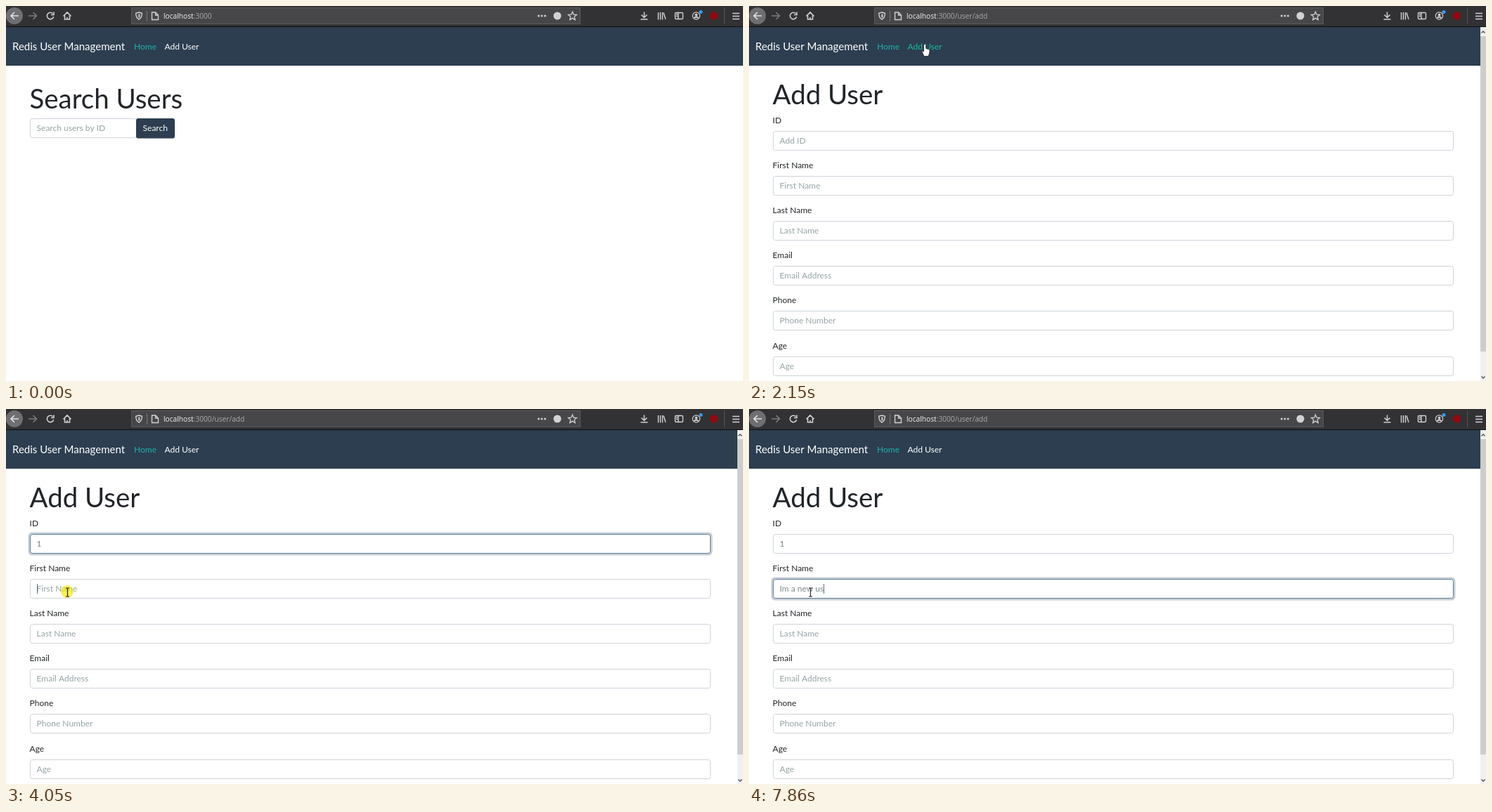
Recreate the animation shown at these times as an HTML page with a canvas. Size 1048x534 px, loop 8 s.

```html
<!DOCTYPE html>
<html lang="en">
<head>
<meta charset="utf-8">
<title>Redis User Management</title>
<style>
  html, body { margin: 0; width: 100%; height: 100%; overflow: hidden; background: #fff; }
  canvas { display: block; width: 1048px; height: 534px; }
</style>
</head>
<body>
<canvas id="stage" width="1048" height="534"></canvas>
<script>
const ctx = document.getElementById('stage').getContext('2d');
const LOOP = 8000, W = 1048, H = 534;
const LATO = 'Lato, sans-serif', UI = '"Open Sans", "Noto Sans", sans-serif';
const NAVY = '#2c3e50', INK = '#212529', HINT = '#95a5a6', TYPED = '#7b8a8b', ICON = '#d2d2d4';

// ---- timeline ----
const NAVIGATE = 2050, ID_TYPED = 3500, FIRST_FOCUS = 4050;
// start, end, number of steps, destination
const moves = [
  [130, 130, 1, 984, 522], [205, 205, 1, 725, 497], [280, 280, 1, 752, 459],
  [430, 1200, 11, 280, 109], [1280, 1660, 6, 250, 54], [2230, 2730, 7, 105, 178],
  [2810, 2970, 3, 127, 191], [3580, 3800, 4, 87, 255], [3980, 4050, 2, 88, 261]
];
const clicks = [[1890, 2050], [2970, 3140], [3980, 4210]];
const statusShown = [[1580, NAVIGATE], [2230, 2810]];
const phrase = 'Im a new us';
const keyTimes = [5660, 5910, 6120, 6350, 6430, 6660, 6810, 6990, 7140, 7720, 7860];
const fields = [
  ['ID', 'Add ID'], ['First Name', 'First Name'], ['Last Name', 'Last Name'],
  ['Email', 'Email Address'], ['Phone', 'Phone Number'], ['Age', 'Age']
];

const during = (t, spans) => spans.some(([a, b]) => t >= a && t < b);
const smooth = p => p * p * (3 - 2 * p);
const fade = (t, a, b) => t < a ? 0 : t < b ? 0.6 : 1;

function pointer(t) {
  let x = 1080, y = 540;
  for (const [a, b, n, tx, ty] of moves) {
    if (t < a) break;
    const k = b > a ? Math.floor((t - a) / (b - a) * (n - 1) + 1e-6) + 1 : 1;
    const p = smooth(Math.min(1, k / n));
    x = Math.round(x + (tx - x) * p);
    y = Math.round(y + (ty - y) * p);
  }
  return { x, y };
}

// ---- drawing helpers ----
function rect(x, y, w, h, color) {
  ctx.fillStyle = color;
  ctx.fillRect(x, y, w, h);
}
function text(str, x, y, size, color, family = LATO) {
  ctx.font = size + 'px ' + family;
  ctx.fillStyle = color;
  ctx.fillText(str, x, y);
  return ctx.measureText(str).width;
}
function disc(x, y, r, color) {
  ctx.fillStyle = color;
  ctx.beginPath();
  ctx.arc(x, y, r, 0, 7);
  ctx.fill();
}
function line(d, color = ICON, width = 1.4) {
  ctx.strokeStyle = color;
  ctx.lineWidth = width;
  ctx.stroke(new Path2D(d));
}
function frame(x, y, w, h, r, color, width = 1) {
  ctx.strokeStyle = color;
  ctx.lineWidth = width;
  ctx.beginPath();
  ctx.roundRect(x, y, w, h, r);
  ctx.stroke();
}

// ---- browser toolbar ----
function star(cx, cy, r) {
  let d = '';
  for (let i = 0; i < 10; i++) {
    const a = -Math.PI / 2 + i * Math.PI / 5, q = i % 2 ? r * 0.45 : r;
    d += (i ? 'L' : 'M') + (cx + q * Math.cos(a)) + ',' + (cy + q * Math.sin(a));
  }
  return d + 'Z';
}

function toolbar(path) {
  rect(0, 0, W, 29, '#323234');
  rect(0, 29, W, 1, '#0f0f11');

  disc(12, 14, 12, '#6f6f71');
  line('M18 14H7M12 9L7 14L12 19', '#e4e4e6', 1.6);
  line('M32 14H43M38.5 9L43.5 14L38.5 19', '#7b7b7d', 1.6);
  line('M66.5 10.8A4.7 4.7 0 1 0 67.6 15.2', ICON, 1.6);
  line('M68 8.5V12.5H64', ICON, 1.6);
  line('M81.5 14.5L87 9L92.5 14.5M83.5 13.5V19H90.5V13.5M87 19V16', ICON, 1.6);

  rect(178, 2, 639, 24, '#5b5b5d');
  rect(179, 3, 637, 22, '#474749');
  line('M189 9L193.3 10.3C193.4 15 192 17.5 189 19.2C186 17.5 184.6 15 184.7 10.3Z');
  line('M189.3 11.5V16.5', ICON, 2);
  line('M200.5 7V22', '#77777a', 1);
  line('M207.5 9H212.5L216.5 13V19.5H207.5ZM212.5 9V13H216.5');
  const host = text('localhost', 224, 18, 10.2, '#f2f2f4', UI);
  text(':3000' + path, 224 + host, 18, 10.2, '#aaaaad', UI);

  for (const x of [757.5, 762, 766.5]) disc(x, 14, 1.5, ICON);
  disc(784, 14, 5.5, ICON);
  line(star(805.5, 14.5, 6.3), ICON, 1.3);

  line('M907.5 8.5V16M903.5 12.5L907.5 16.5L911.5 12.5M902.5 19H912.5', ICON, 1.5);
  line('M927.5 9V19.5M930.5 9V19.5M933.5 9V19.5M935 9.5L938 19', ICON, 1.4);
  frame(951.5, 9.5, 11, 9, 1.5, ICON, 1.4);
  line('M956 9.5V18.5M953 12H955M953 14.5H955');
  ctx.strokeStyle = ICON;
  ctx.lineWidth = 1.2;
  ctx.beginPath();
  ctx.arc(981.5, 14, 5.2, 0, 7);
  ctx.stroke();
  disc(981.5, 12.7, 2, ICON);
  line('M978.5 17Q981.5 14.5 984.5 17', ICON, 1.8);
  disc(988, 8.5, 2.5, '#3b9bea');
  disc(1006.5, 14, 5.8, '#8f0b12');
  line('M1021.5 2V26', '#555557', 1);
  line('M1033 10.5H1043M1033 14.5H1043M1033 18.5H1043', ICON, 1.5);
}

// ---- pages ----
function navbar(width, hover) {
  rect(0, 30, width, 55, NAVY);
  text('Redis User Management', 9, 63, 15, '#fff');
  text('Home', 182, 62, 12, '#20b2aa');
  text('Add User', 225.5, 62, 12, hover ? '#18bc9c' : '#fff');
}

function searchPage() {
  text('Search Users', 33.6, 146, 38.4, INK);
  frame(34.5, 160.5, 151, 27, 3, '#ced4da');
  text('Search users by ID', 43.6, 178, 12, HINT);
  ctx.fillStyle = NAVY;
  ctx.beginPath();
  ctx.roundRect(185, 160, 55, 28.5, 3);
  ctx.fill();
  text('Search', 194.6, 178, 12, '#fff');
}

function input(top, focus, value, hint, caret) {
  frame(34.5, top + 0.5, 967, 27, 3, '#ced4da');
  if (focus > 0) {
    ctx.globalAlpha = focus;
    frame(32.8, top - 1.2, 970.4, 30.4, 4, 'rgba(44,62,80,.25)', 2.5);
    frame(34.5, top + 0.5, 967, 27, 3, '#597ea2');
    ctx.globalAlpha = 1;
  }
  const w = text(value || hint, 43.6, top + 18, 12, value ? TYPED : HINT);
  if (caret) rect(Math.round(43.6 + (value ? w : 0)), top + 7, 1, 14, '#5f7476');
}

function formPage(t) {
  text('Add User', 33.6, 139.5, 38.4, INK);
  const typed = phrase.slice(0, keyTimes.filter(k => t >= k).length);
  const swap = fade(t, 4140, 4210);
  fields.forEach(([label, hint], i) => {
    const top = Math.round(178 + 64.1 * i);
    text(label, 33.6, top - 11, 12, INK);
    if (i === 0) {
      input(top, fade(t, 3060, 3140) - swap, t >= ID_TYPED ? '1' : '', hint, t >= 2970 && t < FIRST_FOCUS);
    } else if (i === 1) {
      input(top, swap, typed, hint, t >= FIRST_FOCUS && !during(t, [[4620, 5100]]));
    } else {
      input(top, 0, '', hint, false);
    }
  });
  rect(1040, 30, 8, 504, '#f0f0f0');
  rect(1040, 43, 8, 449, '#cdcdcd');
  line('M1041.5 38.5L1044 36L1046.5 38.5M1041.5 527.5L1044 530L1046.5 527.5', '#505050', 1.4);
}

function statusBar() {
  rect(0, 519, 102, 15, '#4a4a4f');
  rect(0, 520, 101, 14, '#2b2b2e');
  text('localhost:3000/user/add', 0, 531.5, 8.7, '#f9f9fa', UI);
}

// ---- pointer shapes ----
const arrow = new Path2D('M.5 .5V12.8L3.3 10.2L5.3 14.6L7 13.8L5 9.5H8.6Z');
const hand = new Path2D('M-1.5 1.2Q0 -.6 1.5 1.2V6.5L5.8 7.8Q7.2 8.3 7 10L6.3 14L5 17.5H-1L-3.8 11.5Q-4 9.2 -1.5 11Z');

function drawPointer(x, y, kind) {
  ctx.save();
  ctx.translate(x, y);
  if (kind === 'beam') {
    line('M-3 -6H-1Q-.5 -6 -.5 -5V5Q-.5 6 -1 6H-3M2 -6H0Q-.5 -6 -.5 -5M2 6H0Q-.5 6 -.5 5', '#1c1c1c', 1.1);
  } else {
    const shape = kind === 'hand' ? hand : arrow;
    ctx.fillStyle = '#fff';
    ctx.fill(shape);
    ctx.strokeStyle = '#111';
    ctx.lineWidth = kind === 'hand' ? 0.7 : 0.9;
    ctx.stroke(shape);
  }
  ctx.restore();
}

function draw(t) {
  const form = t >= NAVIGATE, p = pointer(t);
  const hover = p.x > 219 && p.x < 279 && p.y > 45 && p.y < 71;
  const onHeading = p.x < 186 && p.y > 106 && p.y < 146;
  const onInput = p.y >= 178 && (p.y - 178) % 64 < 28;
  const kind = hover ? 'hand' : form && (onHeading || onInput) ? 'beam' : 'arrow';

  rect(0, 0, W, H, '#fff');
  toolbar(form ? '/user/add' : '');
  navbar(form ? 1040 : W, hover);
  if (form) formPage(t); else searchPage();
  if (during(t, statusShown)) statusBar();
  if (during(t, clicks)) disc(p.x - 1, p.y - 1, 9, 'rgba(245,232,0,.65)');
  if (t >= moves[0][0]) drawPointer(p.x, p.y, kind);
}

function tick() {
  draw(performance.now() % LOOP);
  requestAnimationFrame(tick);
}
tick();
</script>
</body>
</html>
```
